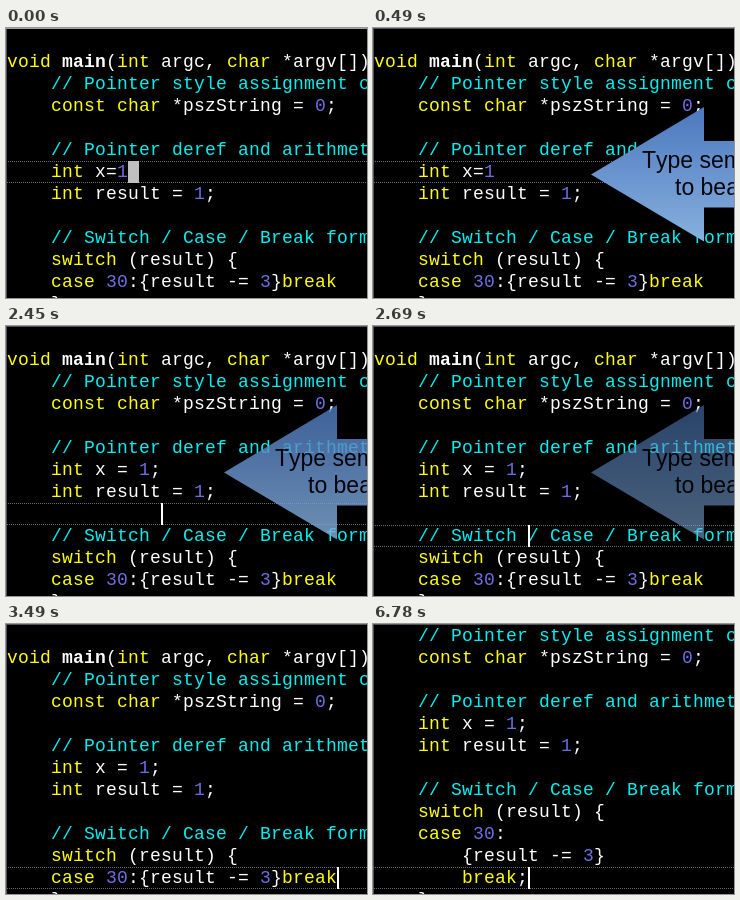
An HTML page with a canvas for the animation above (6980 ms loop, 361x270 px).

```html
<!DOCTYPE html>
<html lang="en">
<head>
<meta charset="utf-8">
<title>Semicolon formatting</title>
<style>
  html, body { margin: 0; width: 361px; height: 270px; overflow: hidden; background: #000; }
  canvas { display: block; }
</style>
</head>
<body>
<canvas id="stage" width="361" height="270"></canvas>
<script>
const W = 361, H = 270, LOOP = 6980;
const CELL = 11, ROW = 22, EDGE = 1;
const STEP = 60, FADE_OUT = 2330, REFORMAT = 1350, SPLIT = 4750;
const CODE_FONT = '18px "Liberation Mono", "Courier New", monospace';
const NOTE_FONT = '23px "Liberation Sans", Arial, sans-serif';
const ctx = document.getElementById('stage').getContext('2d', { alpha: false });

// Caret states: time, column, row, visible
const carets = [
  [0, 11, 6, 1], [490, 11, 6, 0], [1020, 11, 6, 1],
  [REFORMAT, 14, 6, 1], [1810, 14, 6, 0],
  [2070, 14, 7, 1], [2330, 14, 8, 1], [2630, 14, 9, 1], [2870, 14, 10, 1], [3110, 14, 11, 1],
  [3490, 30, 11, 1], [4020, 30, 11, 0], [4550, 30, 11, 1],
  [SPLIT, 14, 13, 1], [5280, 14, 13, 0], [5800, 14, 13, 1], [6280, 14, 13, 0], [6780, 14, 13, 1]
];

function codeAt(t) {
  const tail = t < SPLIT
    ? ['    case 30:{result -= 3}break']
    : ['    case 30:', '        {result -= 3}', '        break;'];
  return [
    '',
    'void main(int argc, char *argv[])',
    '    // Pointer style assignment check',
    '    const char *pszString = 0;',
    '',
    '    // Pointer deref and arithmetic',
    t < REFORMAT ? '    int x=1' : '    int x = 1;',
    '    int result = 1;',
    '',
    '    // Switch / Case / Break formatting',
    '    switch (result) {',
    ...tail,
    '    }'
  ];
}

function colorOf(token) {
  if (token.startsWith('//')) return '#00f0f0';
  if (/^(void|int|char|const|switch|case|break)$/.test(token)) return '#ffff00';
  return /^\d/.test(token) ? '#6e6ee0' : '#ffffff';
}

function drawLine(text, y) {
  for (const { 0: token, index } of text.matchAll(/\/\/.*|\w+|[^\s\w]/g)) {
    ctx.fillStyle = colorOf(token);
    ctx.font = (token === 'main' ? 'bold ' : '') + CODE_FONT;
    [...token].forEach((ch, i) => ctx.fillText(ch, EDGE + (index + i) * CELL, y + 16));
  }
}

// Dots follow a checkerboard, so odd and even rows are offset by a pixel
function drawDots(y) {
  ctx.fillStyle = '#6a6a6a';
  for (let x = (y + 1) % 2; x < W; x += 2) ctx.fillRect(x, y, 1, 1);
}

function drawEditor(t) {
  const [, col, row, on] = carets.findLast(c => c[0] <= t);
  const scroll = t < SPLIT ? 0 : 2;
  const top = i => EDGE + (i - scroll) * ROW;
  const start = t < STEP;

  ctx.fillStyle = '#000';
  ctx.fillRect(0, 0, W, H);
  codeAt(t).forEach((line, i) => { if (i >= scroll) drawLine(line, top(i)); });

  ctx.fillStyle = '#50505a';
  ctx.fillRect(0, 0, 1, H);
  ctx.fillStyle = start ? '#a0a0a0' : '#50505a';
  ctx.fillRect(0, 0, W, 1);
  drawDots(top(row));
  drawDots(top(row) + ROW - 1);

  if (on) {
    ctx.fillStyle = start ? '#c0c0c0' : '#fff';
    ctx.fillRect(EDGE + col * CELL, top(row), start ? CELL : 2, ROW);
  }
}

function noteOpacity(t) {
  if (t < FADE_OUT) return Math.min(1, Math.floor(t / STEP) / 6);
  return Math.max(0, 1 - (Math.floor((t - FADE_OUT) / STEP) + 1) / 16);
}

// The callout is composed once so that it fades as a single layer
function makeNote() {
  const layer = document.createElement('canvas');
  layer.width = W;
  layer.height = H;
  const g = layer.getContext('2d');
  const fill = g.createLinearGradient(0, 79, 0, 213);
  fill.addColorStop(0, '#4c78be');
  fill.addColorStop(1, '#86b0de');
  g.beginPath();
  g.moveTo(218, 146.5);
  g.lineTo(331, 79);
  g.lineTo(331, 113);
  g.lineTo(W, 113);
  g.lineTo(W, 179.5);
  g.lineTo(331, 179.5);
  g.lineTo(331, 213.5);
  g.closePath();
  g.fillStyle = fill;
  g.fill();
  g.fillStyle = '#06060c';
  g.font = NOTE_FONT;
  g.fontKerning = 'none';
  g.fillText('Type semicolon', 269, 140);
  g.fillText('to beautify', 302, 167);
  return layer;
}

const note = makeNote();

function frame() {
  const t = performance.now() % LOOP;
  drawEditor(t);
  ctx.globalAlpha = noteOpacity(t);
  ctx.drawImage(note, 0, 0);
  ctx.globalAlpha = 1;
  requestAnimationFrame(frame);
}
frame();
</script>
</body>
</html>
```
